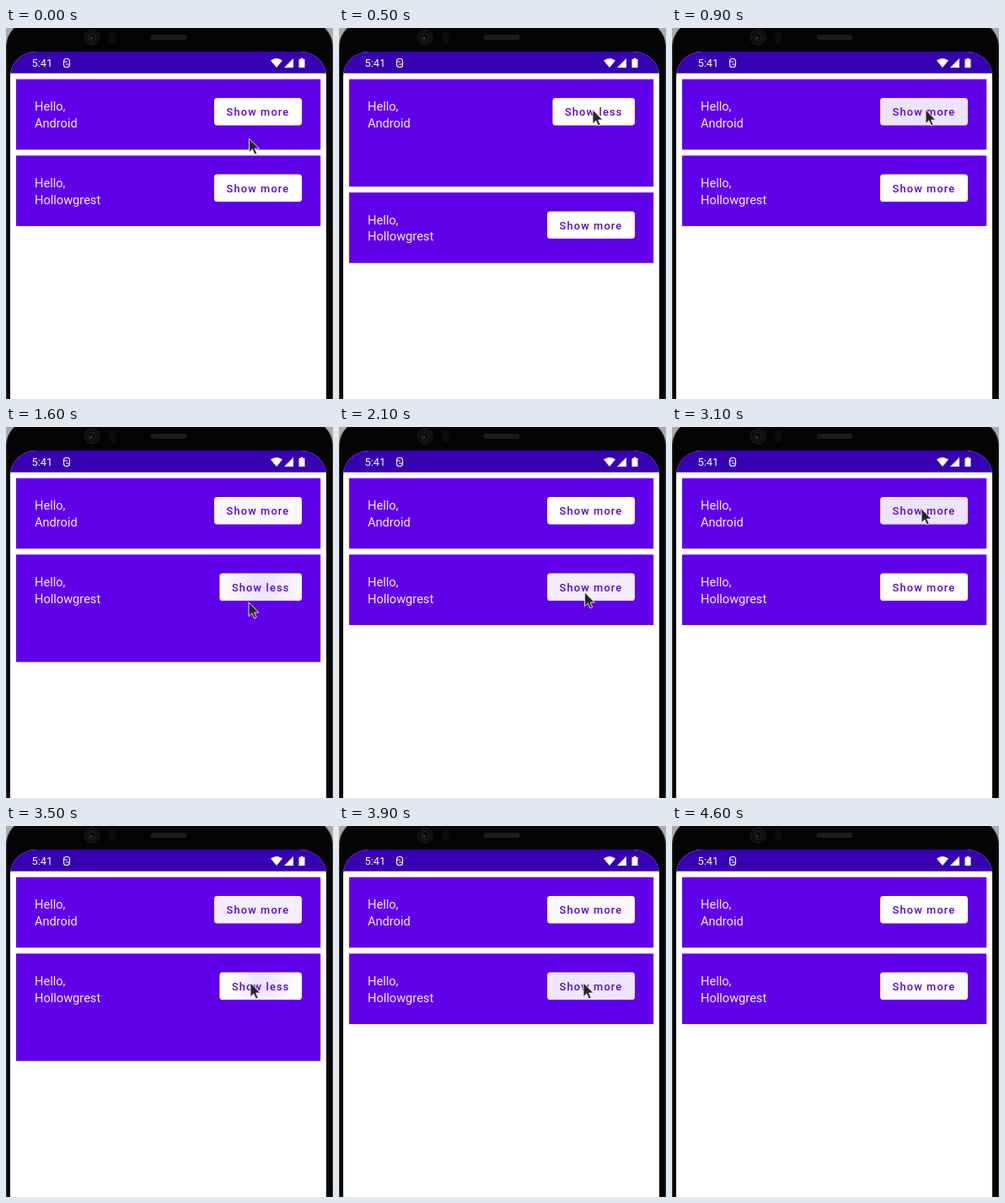
Animation of 388x440 px, one loop 4.7 s. Source, as an HTML page:

```html
<!DOCTYPE html>
<html lang="en">
<head>
<meta charset="utf-8">
<title>Expanding greeting cards</title>
<style>
  html, body { margin: 0; width: 100%; height: 100%; overflow: hidden; background: #fff; }
  svg { display: block; width: 388px; height: 440px; }
  text { font-family: Roboto, Arial, sans-serif; }
  .greeting { font-size: 14.6px; fill: #f4edff; }
  .label { font-size: 12.8px; font-weight: 500; letter-spacing: 1.14px; fill: #5608cc; }
  .surface { fill: #6000ea; }
  .button { fill: #fff; filter: drop-shadow(0 .5px .6px rgba(0, 0, 0, .35)); }
</style>
</head>
<body>
<svg viewBox="0 0 388 440">
  <defs>
    <clipPath id="screen"><path d="M5 440V57A31 29 0 0 1 36 28H349A31 29 0 0 1 380 57V440Z"/></clipPath>
    <radialGradient id="glow0" gradientUnits="userSpaceOnUse">
      <stop offset=".2" stop-color="#6200ee"/><stop offset="1" stop-color="#6200ee" stop-opacity="0"/>
    </radialGradient>
    <radialGradient id="glow1" href="#glow0"/>
  </defs>

  <!-- Phone body -->
  <rect width="388" height="40" fill="#aaa"/>
  <rect x=".5" y="-8" width="387" height="500" rx="30" fill="#040404" stroke="#333"/>
  <circle cx="102" cy="11" r="9" fill="#0e0e0e" stroke="#1e1e1e"/>
  <circle cx="102" cy="11" r="4.5" fill="#0a0b0d" stroke="#24262a"/>
  <circle cx="101" cy="12" r="1.5" fill="#3a3f46"/>
  <rect x="122.5" y="4" width="8" height="14" rx="3" fill="#0c0c0c"/>
  <rect x="171.5" y="8" width="43" height="6" rx="3" fill="#1c1c1c"/>

  <g clip-path="url(#screen)">
    <rect x="5" y="28" width="375" height="412" fill="#fff"/>
    <rect x="5" y="28" width="375" height="25.7" fill="#3700b3"/>
    <text x="30.5" y="46" font-size="12.8" fill="#fff">5:41</text>
    <g fill="none" stroke="#fff" stroke-width="1.1">
      <rect x="68.5" y="36.5" width="7" height="10" rx="3"/>
      <path d="M68.5 40H73M71 43H75.5"/>
    </g>
    <g fill="#fff">
      <path d="M314 38.5Q321 33.5 328 38.5L321 47Z"/>
      <path d="M330 47H341V36Z"/>
      <path d="M347.5 37H349.5V35.7H352.5V37H354.5V47H347.5Z"/>
    </g>
    <g id="cards"></g>
  </g>

  <path id="cursor" d="M0 0V16.5L3.9 12.9 6.5 18.9 9.2 17.8 6.6 12H11.8Z"
        fill="#262626" stroke="#eee" stroke-width=".9" stroke-linejoin="round"/>
</svg>

<script>
const LOOP = 4700, STEP = 100;
const CARD_TOP = 60.7, CARD_H = 83.6, EXTRA = 43.8, GAP = 7;
const TRAVEL = 200, DWELL = 400, FADE = 1000, TINT = .11;

// Where the pointer comes to rest; a stop with "press" opens a card,
// which closes again after DWELL. Presses alternate between the cards.
const stops = [
  { at: 100, x: 288.5, y: 131 },
  { at: 200, x: 298.5, y: 107.5 },
  { at: 500, x: 301, y: 97, press: true },
  { at: 1400, x: 290, y: 188, press: true },
  { at: 1600, x: 288, y: 208 },
  { at: 2100, x: 291.5, y: 196 },
  { at: 2700, x: 296, y: 97, press: true },
  { at: 3400, x: 290, y: 186, press: true },
  { at: 4400, x: 394, y: 60 }
];
const presses = stops.filter(s => s.press);

const clamp = v => Math.min(1, Math.max(0, v));
const ease = k => k * k * (3 - 2 * k);

function pointer(t) {
  let { at, x, y } = stops[0];
  for (const stop of stops.slice(1)) {
    const start = Math.max(at, stop.at - TRAVEL);
    const k = ease(clamp((t - start) / (stop.at - start)));
    x += (stop.x - x) * k;
    y += (stop.y - y) * k;
    at = stop.at;
  }
  return { x, y };
}

function set(el, attrs) {
  for (const key in attrs) el.setAttribute(key, attrs[key]);
}

const root = document.getElementById("cards");
const cursor = document.getElementById("cursor");

const cards = ["Android", "Hollowgrest"].map((name, i) => {
  root.insertAdjacentHTML("beforeend", `<g>
    <rect class="surface" x="12" width="361.2" height="${CARD_H}"/>
    <text class="greeting" x="34" y="37.6">Hello,</text>
    <text class="greeting" x="34" y="57.4">${name}</text>
    <rect class="button" y="22.3" height="32.4" rx="3.6"/>
    <rect class="ripple" y="22.3" height="32.4" rx="3.6"/>
    <text class="label" y="43.5"></text>
  </g>`);
  const el = root.lastElementChild;
  const find = s => el.querySelector(s);
  return {
    el, surface: find(".surface"), button: find(".button"), ripple: find(".ripple"),
    label: find(".label"), glow: document.getElementById("glow" + i)
  };
});

function drawCard(card, i, y, t) {
  const press = presses.filter((p, n) => n % 2 === i && p.at <= t).pop();
  const age = press ? t - press.at : Infinity;
  const open = age < DWELL;
  const left = open ? 253.4 : 247;
  const height = CARD_H + (open ? EXTRA : 0);

  set(card.el, { transform: `translate(0 ${y})` });
  set(card.surface, { height });
  for (const box of [card.button, card.ripple]) set(box, { x: left, width: 351 - left });
  set(card.label, { x: left + 14.6 });
  card.label.textContent = open ? "Show less" : "Show more";

  // The ripple spreads while open, then fades as an even tint
  if (open) set(card.glow, { cx: press.x + 14, cy: press.y - y, r: 25 + age * .15 });
  set(card.ripple, {
    fill: open ? `url(#glow${i})` : "#6200ee",
    opacity: TINT * (open ? clamp(age / 100) : 1 - clamp((age - DWELL) / FADE))
  });
  return y + height + GAP;
}

function frame() {
  const t = Math.floor(performance.now() % LOOP / STEP) * STEP;
  cards.reduce((y, card, i) => drawCard(card, i, y, t), CARD_TOP);
  const { x, y } = pointer(t);
  set(cursor, { transform: `translate(${x} ${y})` });
  requestAnimationFrame(frame);
}
frame();
</script>
</body>
</html>
```
